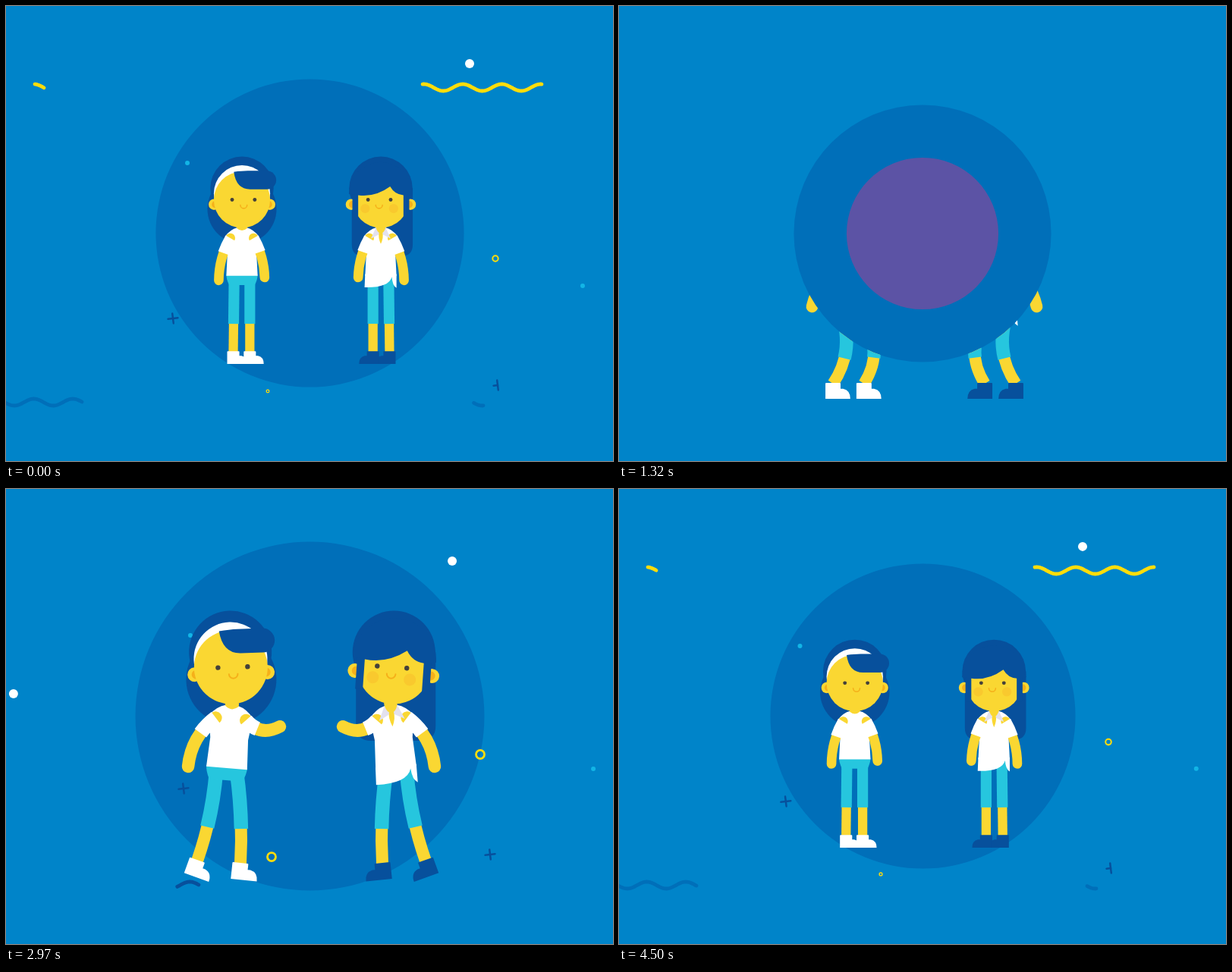
Recreate the animation shown at these times as an HTML page with a canvas. Size 800 by 600 pixels, loop 4.53 s.

```html
<!DOCTYPE html>
<html lang="en">
<head>
<meta charset="utf-8">
<title>High five</title>
<style>
  html, body { margin: 0; width: 100%; height: 100%; overflow: hidden; background: #0084c9; }
  canvas { display: block; }
</style>
</head>
<body>
<canvas id="stage" width="800" height="600"></canvas>
<script>
const ctx = document.getElementById('stage').getContext('2d');
const LOOP = 4530, TAU = Math.PI * 2, DEG = Math.PI / 180;
const SKY = '#0084c9', DISC = '#006fb9', NAVY = '#07509c', SKIN = '#fad732', SUN = '#ffdd0a',
      TEAL = '#26c6de', CYAN = '#12b5e6', PURPLE = '#5c53a5', WHITE = '#fff', ORANGE = '#f5b01a';

// Smooth monotone interpolation through keys [time, ...values]
function track(keys, t) {
  const last = keys.length - 1;
  if (t <= keys[0][0]) return keys[0].slice(1);
  if (t >= keys[last][0]) return keys[last].slice(1);
  let i = 0;
  while (keys[i + 1][0] <= t) i++;
  const span = keys[i + 1][0] - keys[i][0], u = (t - keys[i][0]) / span;
  const slope = (k, j) => k < 0 || k >= last ? 0 : (keys[k + 1][j] - keys[k][j]) / (keys[k + 1][0] - keys[k][0]);
  const tangent = (k, j) => {
    const a = slope(k - 1, j), b = slope(k, j);
    return a * b <= 0 ? 0 : 2 * a * b / (a + b);
  };
  return keys[i].slice(1).map((v, n) => {
    const j = n + 1, w = keys[i + 1][j];
    return v + (w - v) * u * u * (3 - 2 * u)
      + span * u * (1 - u) * (tangent(i, j) * (1 - u) - tangent(i + 1, j) * u);
  });
}

function fillPath(color, path) {
  ctx.fillStyle = color;
  ctx.fill(new Path2D(path));
}
function circle(x, y, r, color) {
  if (r <= 0) return;
  ctx.fillStyle = color;
  ctx.beginPath();
  ctx.arc(x, y, r, 0, TAU);
  ctx.fill();
}
function stroke(color, width, cap = 'round') {
  ctx.strokeStyle = color;
  ctx.lineWidth = width;
  ctx.lineCap = cap;
  ctx.stroke();
}
function line(x1, y1, x2, y2, color, width) {
  ctx.beginPath();
  ctx.moveTo(x1, y1);
  ctx.lineTo(x2, y2);
  stroke(color, width);
}
function placed(x, y, angle, draw) {
  ctx.save();
  ctx.translate(x, y);
  ctx.rotate(angle);
  draw();
  ctx.restore();
}

// Bent limb whose first part wears cloth
function limb([x0, y0], x1, y1, bend, skinWidth, cloth, clothWidth, part) {
  const len = Math.hypot(x1 - x0, y1 - y0) || 1;
  const cx = (x0 + x1) / 2 - (y1 - y0) / len * bend, cy = (y0 + y1) / 2 + (x1 - x0) / len * bend;
  const mix = (a, b) => a + (b - a) * part;
  const mx = mix(x0, cx), my = mix(y0, cy);
  ctx.beginPath();
  ctx.moveTo(x0, y0);
  ctx.quadraticCurveTo(cx, cy, x1, y1);
  stroke(SKIN, skinWidth, cloth === TEAL ? 'butt' : 'round');
  ctx.beginPath();
  ctx.moveTo(x0, y0);
  ctx.quadraticCurveTo(mx, my, mix(mx, mix(cx, x1)), mix(my, mix(cy, y1)));
  stroke(cloth, clothWidth, 'butt');
}

// lean, head x y, outer hand x y bend, inner hand x y bend, outer foot x y turn bend, inner foot x y turn bend
const stand  = [0, 0, -130, -40, 9, 10, 39, 4, -9, -15, 131, 0, 0, 13.5, 131, 0, 0];
const hips   = [0, 0, -130, -31, -1, 28, 32, -5, -28, -14, 132, 0, 0, 14, 132, 0, 0];
const crouch = [5, 10, -122, -55, -7, 14, 36, -2, -16, -26, 99, 0, -24, 17, 99, 0, -32];
const jump   = [9.7, 20, -130, -59, -15, 12, 87, -106, 27, -104, 51, 128, -48, 27, 117, 37, -26];
const land   = [4.8, 8, -132, -51, -1, 16, 70, -54, 18, -39, 122, 20, -8, 18, 126, 6, -6];
const oneHip = [...stand.slice(0, 6), ...hips.slice(6)];

// time, scale, hip x y, head tilt, pose
const girlKeys = rest => [
  [1200, .95, 307, 402, 0, ...crouch],
  [1650, .95, 305, 408, 0, ...crouch],
  [1900, .97, 304, 404, 0, ...crouch],
  [2200, 1, 298, 346, -2, ...jump],
  [2340, 1, 297, 340, -2, ...jump],
  [2550, 1, 295, 344, -2, ...jump],
  [2970, 1, 291, 367, -2, ...land],
  [3200, 1, 287, 398, -2, ...stand],
  [3600, .99, 287, 396, -2, ...stand],
  [3900, .957, 289, 386, -2.5, ...stand],
  [4400, .785, 309, 360, 0, ...stand],
  [4530, .765, 311, 355, 0, ...stand],
  [4800, .755, 312, 353, 0, ...stand],
  [5310, .72, 316, 349, -4.8, ...rest],
  [5800, .7, 318, 347, -4.8, ...rest]
];
const leftKeys = girlKeys(hips), rightKeys = girlKeys(oneHip);

function shoe(x, y, turn, color) {
  placed(x, y, turn * DEG, () => fillPath(color, 'M-10.5 1Q-10.5 0-9.5 0H9.5Q10.5 0 10.5 1V8H14Q24 10 24 22H-10.5Z'));
}

function backHair(long) {
  circle(0, -20, 54.5, NAVY);
  if (long) fillPath(NAVY, 'M-55-20H50V77Q50 97 30 97H-35Q-55 97-55 77Z');
  else circle(0, 16, 59.5, NAVY);
}

function face(long, squint) {
  const ear = long ? 51 : 48;
  for (const side of [-1, 1]) {
    circle(side * ear, 8, 9.5, SKIN);
    circle(side * (ear - 2), 8, 6, ORANGE);
  }
  if (!long) circle(0, -11, 48.5, WHITE);
  circle(0, 0, 48.5, SKIN);
  if (long) {
    circle(-22, 15, 8, '#f9c92e');
    circle(27, 15, 8, '#f9c92e');
  }
  ctx.fillStyle = '#45413a';
  for (const x of [-17, 22]) {
    ctx.beginPath();
    ctx.arc(x, 0, 3.2, squint ? Math.PI : 0, TAU);
    ctx.fill();
  }
  ctx.beginPath();
  ctx.arc(3, 9, 5.8, 0, Math.PI);
  stroke(ORANGE, 2);
  if (long) {
    fillPath(NAVY, 'M39-12H49V32H39ZM-39-12H-49V32H-39Z');
    fillPath(NAVY, 'M55-10L39-8Q10-4-16-23Q-24-9-39-8L-55-10A55 55 0 1 1 55-10Z');
  } else {
    fillPath(NAVY, 'M-14-48Q0-50 10-50H43A16 16 0 0 1 43-18H14Q-10-18-14-48Z');
  }
}

function girl(t, long) {
  const [s, x, y, tilt, lean, hx, hy, ox, oy, ob, ix, iy, ib, fx, fy, fr, fb, gx, gy, gr, gb] =
    track(long ? rightKeys : leftKeys, t);
  const turn = tilt * (long ? 2 : 1), a = lean * DEG, sin = Math.sin(a), cos = Math.cos(a);
  const joint = (px, py) => [px * cos - py * sin, px * sin + py * cos];
  const headX = hx + turn * 1.3, shoes = long ? NAVY : WHITE;
  ctx.save();
  if (long) {
    ctx.translate(800, 0);
    ctx.scale(-1, 1);
  }
  ctx.translate(long ? x - 5 : x, y);
  ctx.scale(s, s);

  placed(headX, hy, long ? 0 : turn * DEG, () => backHair(long));
  limb(joint(-13.5, 5), fx, fy + 1, fb, 16, TEAL, 18.5, .62);
  limb(joint(13.5, 5), gx, gy + 1, gb, 16, TEAL, 18.5, .62);
  shoe(fx, fy, fr, shoes);
  shoe(gx, gy, gr, shoes);
  placed(0, 0, a, () => {
    fillPath(TEAL, 'M-27-1H27Q27 7 22 17H-22Q-27 7-27-1Z');
    fillPath(WHITE, 'M-8-82Q-20-79-29-67L-25-38L-27 1H27L25-38L29-67Q20-79 8-82Z');
    if (long) fillPath(WHITE, 'M27-2L28 21Q-14 22-19 3Q-20 18-27 22V-2Z');
  });
  limb(joint(-20, -64), ox, oy, ob, 16.5, WHITE, 19, .37);
  limb(joint(20, -64), ix, iy, ib, 16.5, WHITE, 19, .37);
  placed(0, 0, a, () => {
    if (long) {
      fillPath('#e3e1ee', 'M8-83L17-63L2-71ZM-8-83L-17-63L-2-71Z');
      fillPath(SKIN, 'M-9-86H9Q8-77 3-73Q5-65 0-54Q-5-65-3-73Q-8-77-9-86Z');
    } else {
      fillPath(SKIN, 'M-9-86H9V-81Q0-73-9-81Z');
    }
  });
  placed(headX, hy, turn * DEG, () => face(long, t > 2150 && t < 2700));
  ctx.restore();
}

// Decorations burst from the clap: time, x, y, size
const burst = keys => [[2200, 400, 240, 0], ...keys];
const discKeys = [[1620, 0], [2160, 248], [2250, 252.5], [2340, 251], [2700, 243], [2970, 230],
  [3900, 208], [4400, 199.5], [4500, 201], [4530, 203], [5310, 254.5], [5800, 290]];
const dots = [
  [WHITE, burst([[2970, 588, 95, 6], [3900, 610.5, 74, 6], [4530, 611, 76, 6], [5310, 611, 81, 6], [5700, 611, 84, 0]])],
  [WHITE, burst([[2340, 194, 250, 1], [2700, 52, 265, 6], [2970, 10, 270, 6], [3200, -15, 273, 6]])],
  [CYAN, burst([[2340, 651, 333, 1.5], [2700, 744, 360, 3], [2970, 774, 369, 3], [3300, 788, 367, 3],
    [3900, 779, 366, 3], [4530, 760, 369, 3], [5200, 745, 372, 0]])],
  [CYAN, burst([[2970, 243, 193, 3], [3900, 228, 208, 3], [4530, 239, 207, 3], [5310, 251, 189, 1], [5450, 253, 186, 0]])]
];
const rings = [
  burst([[2340, 376, 366, 2], [2970, 350, 485, 6], [3900, 345, 507, 4], [4530, 345, 508, 2], [4900, 345, 509, 0]]),
  burst([[2970, 625, 350, 6], [3900, 648, 345, 6], [4530, 645, 333, 4], [5310, 649, 317, 1], [5450, 650, 314, 0]])
];
// time, x, y, then vertical, left and right arm lengths
const pluses = [
  [[2500, 320, 310, 0, 0, 0], [2970, 234, 395, 6.5, 6.5, 6.5], [3900, 217, 412, 6.5, 6.5, 6.5],
    [4530, 220, 412, 6.5, 6.5, 6.5], [5310, 227, 416, 2.5, 0, 0], [5450, 228, 417, 0, 0, 0]],
  [[2500, 510, 360, 0, 0, 0], [2970, 638, 482, 6.5, 6.5, 6.5], [3900, 650, 500, 6.5, 6.5, 6.5],
    [4530, 648, 500, 6.5, 5.5, 0], [5310, 652, 508, 1, 0, 0], [5450, 652, 509, 0, 0, 0]]
];
// time, start x, end x of the visible stretch
const waves = [
  [SUN, 107.5, [[3300, 511, 511], [3900, 511, 653], [4500, 548, 705], [4530, 549, 706], [5310, 617, 706], [5700, 706, 706]]],
  [SUN, 107.5, [[4000, 38, 38], [4500, 38, 49], [4530, 38, 50], [5310, 38, 55]]],
  [DISC, 522.5, [[2750, 255, 255], [2970, 226, 254], [3500, -20, 180], [3900, -20, 128], [4500, -20, 102], [4530, -20, 100], [5310, -20, 80]]],
  [DISC, 522.5, [[3850, 629, 629], [3900, 628, 629], [4500, 617, 629], [5310, 606, 629], [5700, 602, 629]]]
];
// colour, direction x y of travel
const confetti = [[WHITE, 8, -70], [TEAL, -57, -17], ['#4cc3d0', 62, 10], [SUN, -48, 55], [NAVY, 12, 48], [NAVY, -139, 134]];

function decorations(t) {
  for (const [color, y, keys] of waves) {
    const [from, to] = track(keys, t);
    if (to - from < .3) continue;
    ctx.beginPath();
    for (let x = from; x < to + 1; x++) {
      const px = Math.min(x, to);
      ctx.lineTo(px, y - 4.5 * Math.cos((px - 602) / 51.4 * TAU));
    }
    ctx.lineJoin = 'round';
    stroke(t < 3200 ? NAVY : color, 4.8);
  }
  for (const [color, keys] of dots) circle(...track(keys, t), color);
  for (const keys of rings) {
    const [x, y, r] = track(keys, t);
    if (r <= 0) continue;
    ctx.beginPath();
    ctx.arc(x, y, r * .92, 0, TAU);
    stroke(SUN, .5 + r * .38);
  }
  for (const keys of pluses) {
    const [x, y, v, l, r] = track(keys, t);
    if (v > 0) placed(x, y, -.12, () => {
      line(0, -v, 0, v, NAVY, 2.5);
      if (l + r > 0) line(-l, 0, r, 0, NAVY, 2.5);
    });
  }
  const p = (t - 2200) / 450;
  if (p > 0 && p < 1) for (const [color, dx, dy] of confetti) {
    const far = 1 - (1 - p) ** 2, half = 8 * (1 - p) / Math.hypot(dx, dy);
    const at = k => [403 + dx * k, 235 + dy * k];
    line(...at(far - half), ...at(far + half), color, 4.5);
  }
}

function scene(t) {
  ctx.fillStyle = SKY;
  ctx.fillRect(0, 0, 800, 600);
  circle(400.5, 299.5, track(discKeys, t)[0], DISC);
  decorations(t);
  girl(t, false);
  girl(t, true);
}

const irisRadius = t => Math.max(0, 578 - (Math.max(0, t - 318) / 49.63) ** 2);

function outside(radius, draw) {
  ctx.save();
  ctx.beginPath();
  ctx.rect(0, 0, 800, 600);
  ctx.moveTo(400 + radius, 300);
  ctx.arc(400, 300, radius, 0, TAU);
  ctx.clip('evenodd');
  draw();
  ctx.restore();
}

function render(t) {
  if (t < 1560) {
    scene(t + LOOP);
    for (const [lead, color] of [[297, SKIN], [215, PURPLE], [82, DISC]]) {
      outside(irisRadius(t + lead), () => {
        ctx.fillStyle = color;
        ctx.fillRect(0, 0, 800, 600);
      });
    }
    outside(irisRadius(t), () => scene(t));
  } else {
    scene(t);
  }
}

const begin = performance.now();
function tick() {
  render((performance.now() - begin) % LOOP);
  requestAnimationFrame(tick);
}
tick();
</script>
</body>
</html>
```
